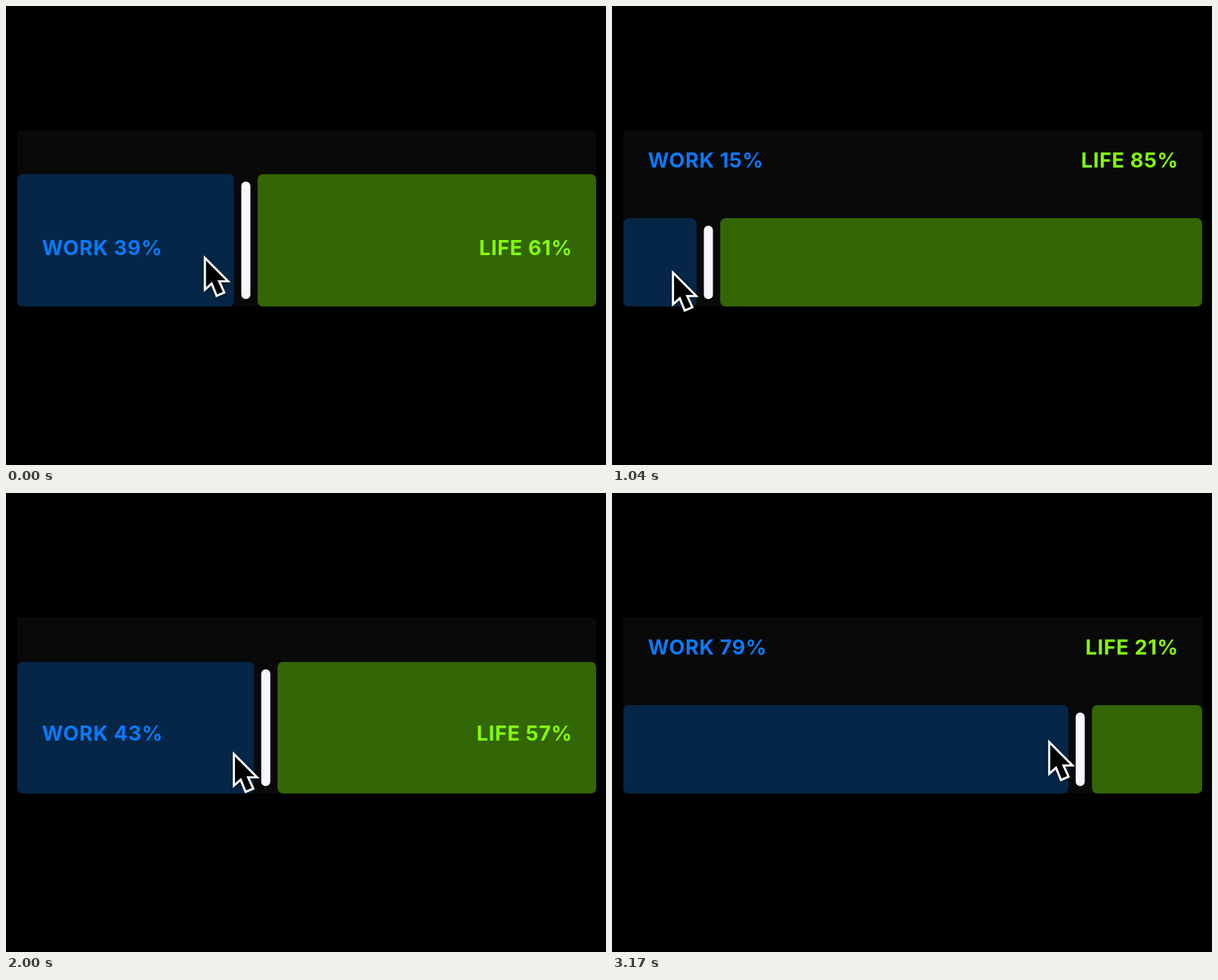
Animation of 794x608 px, one loop 3210 ms. Source, as an HTML page:

```html
<!DOCTYPE html>
<html lang="en">
<head>
<meta charset="utf-8">
<title>Work / life slider</title>
<style>
  html, body { margin: 0; width: 100%; height: 100%; overflow: hidden; background: #000; }
  svg { display: block; width: 794px; height: 608px; }
  text { font: 700 27px Inter, "Liberation Sans", sans-serif; letter-spacing: .7px; }
</style>
</head>
<body>
<svg viewBox="0 0 794 608">
  <defs>
    <filter id="shadow" x="-30%" y="-20%" width="160%" height="160%">
      <feDropShadow dx="0" dy="2" stdDeviation="2" flood-opacity=".4"/>
    </filter>
  </defs>
  <rect x="15" y="164.5" width="766" height="233.5" fill="#090909"/>
  <rect id="workBar" x="15" rx="7" fill="#052646"/>
  <rect id="lifeBar" rx="7" fill="#336604"/>
  <rect id="handle" width="12" rx="6" fill="#f8f5fd"/>
  <text id="workText" x="47.5" fill="#0a7aff"></text>
  <text id="lifeText" x="749.7" text-anchor="end" fill="#84ff0a"></text>
  <path id="cursor" d="M1.4 3.4V45.4L10.4 37.4L16.9 53.6L27 49.3L20.2 34.3H32.1Z"
        fill="#000" stroke="#fff" stroke-width="2.8" filter="url(#shadow)"/>
</svg>
<script>
const LOOP = 3210, FPS = 24;
const LEFT = 15, RIGHT = 781, BOTTOM = 398, HALF_GAP = 15.6;
const NARROW = 245; // handle this close to an end folds the labels out

// Drag strokes: [first frame, last frame, distance]
const strokesX = [[-10, 10, -180], [14.2, 25.5, -100.4], [35, 42, 213.7], [46.8, 62, 172.3], [58, 84, 137.7]];
const strokesY = [[-12, 32, 26], [38, 50, -10], [54, 68, -15]];

const clamp = u => Math.min(1, Math.max(0, u));
const ease = u => u * u * (3 - 2 * u);
const glide = (origin, strokes, frame) => strokes.reduce(
  (sum, [from, to, distance]) => sum + distance * ease(clamp((frame - from) / (to - from))), origin);
const handleX = frame => glide(407.4, strokesX, frame);
const cursorY = frame => glide(325.5, strokesY, frame);

// Critically damped spring from 0 to 1
function spring(frames) {
  const x = frames / FPS * 18;
  return 1 - (1 + x) * Math.exp(-x);
}

// Each crossing of the threshold starts another spring
function collapseAt(frame) {
  let collapse = 0, folded = false;
  for (let k = 0; k <= frame; k++) {
    const x = handleX(k), narrow = Math.min(x - LEFT, RIGHT - x) < NARROW;
    if (narrow !== folded) collapse += (narrow ? 1 : -1) * spring(frame - k);
    folded = narrow;
  }
  return collapse;
}

const el = id => document.getElementById(id);
const set = (id, attrs) => {
  for (const name in attrs) el(id).setAttribute(name, attrs[name]);
};

function draw(ms) {
  const frame = Math.min(76, Math.floor((ms % LOOP + 5) * FPS / 1000));
  const x = handleX(frame);
  const speed = (handleX(frame + 0.1) - handleX(frame - 0.1)) / 0.2;
  const collapse = collapseAt(frame);

  const top = 222.7 + 58.4 * collapse, height = BOTTOM - top;
  const baseline = 330.3 - 116.8 * collapse;
  const work = Math.round((x - LEFT) / (RIGHT - LEFT) * 100);

  set('workBar', { y: top, height, width: x - HALF_GAP - LEFT });
  set('lifeBar', { x: x + HALF_GAP, y: top, height, width: RIGHT - x - HALF_GAP });
  set('handle', { x: x - 6, y: top + 9.8, height: height - 19.6 });
  set('workText', { y: baseline });
  set('lifeText', { y: baseline });
  el('workText').textContent = `WORK ${work}%`;
  el('lifeText').textContent = `LIFE ${100 - work}%`;
  // The handle trails the pointer slightly
  const cursorX = x - 46.8 + speed * 0.65;
  set('cursor', { transform: `translate(${cursorX} ${cursorY(frame)})` });
}

const start = performance.now();
function tick() {
  draw(performance.now() - start);
  requestAnimationFrame(tick);
}
tick();
</script>
</body>
</html>
```
